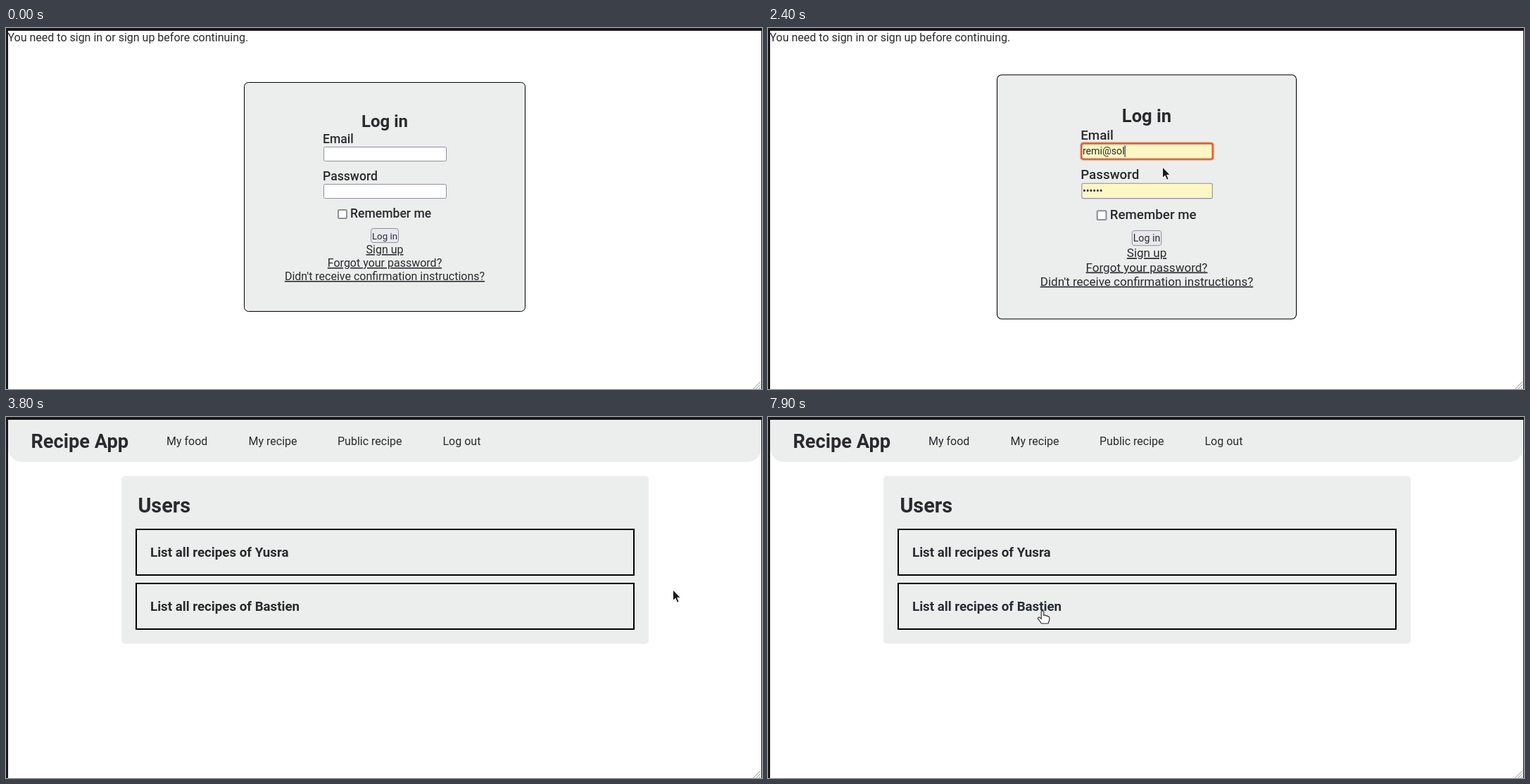
Recreate the animation shown at these times as an HTML page. Size 1074 px wide and 514 px high, loop 8 s.

```html
<!DOCTYPE html>
<html lang="en">
<head>
<meta charset="utf-8">
<title>Recipe App</title>
<style>
  html, body { margin: 0; width: 100%; height: 100%; overflow: hidden; background: #fff; }
  svg { display: block; width: 1074px; height: 514px; font: 16px Roboto, sans-serif; fill: #2a2a2e; }
  .panel { fill: #eceeed; }
  .row { fill: none; stroke: #000; }
  .bold { font-weight: 700; }
  .label { font-size: 17.6px; font-weight: 500; }
  .small { font-size: 13.33px; }
  .item { font-size: 18.72px; font-weight: 700; }
  .mid { text-anchor: middle; }
  .link { text-decoration: underline; }
  .field { fill: #fff; stroke: #8f8f9d; }
  .ring { fill: none; stroke: #e95420; }
</style>
</head>
<body>
<svg viewBox="0 0 1074 514">
  <g id="login">
    <text x="2.5" y="19">You need to sign in or sign up before continuing.</text>
    <g id="card">
      <rect class="panel" x="338.5" y="77.5" width="399" height="326" rx="6" stroke="#000"/>
      <text class="bold mid" x="538" y="141" font-size="24">Log in</text>
      <text class="label" x="450" y="164">Email</text>
      <rect id="email" class="field" x="451.5" y="169.5" width="174" height="20" rx="2"/>
      <g id="focus">
        <rect class="ring" x="449.5" y="167.5" width="178" height="24" rx="4" stroke-width="1.5" opacity=".35"/>
        <rect class="ring" x="451" y="169" width="175" height="21" rx="2.5" stroke-width="2"/>
        <rect id="caret" y="171.5" width="1" height="16"/>
      </g>
      <text id="typed" class="small" x="452.5" y="184"></text>
      <text class="label" x="450" y="217">Password</text>
      <rect id="pass" class="field" x="451.5" y="222.5" width="174" height="20" rx="2"/>
      <text id="dots" class="small" x="452.5" y="237">••••••</text>
      <rect class="field" x="472" y="259" width="12" height="12" rx="1.5" stroke-width="2"/>
      <text class="label" x="489" y="270">Remember me</text>
      <rect id="button" x="518.5" y="285.5" width="39" height="20" rx="3.5"/>
      <text class="small mid" x="538" y="300.5">Log in</text>
      <text class="link mid" x="538" y="321">Sign up</text>
      <text class="link mid" x="538" y="340">Forgot your password?</text>
      <text class="link mid" x="538" y="359">Didn't receive confirmation instructions?</text>
    </g>
  </g>

  <g id="nav">
    <path class="panel" d="M3 4H1073V44a20 20 0 0 1-20 20H23a20 20 0 0 1-20-20z"/>
    <text class="bold" x="35.5" y="44" font-size="27.2">Recipe App</text>
    <text x="228" y="40">My food</text>
    <text x="344.5" y="40">My recipe</text>
    <text x="471" y="40">Public recipe</text>
    <text x="620.5" y="40">Log out</text>
  </g>

  <g id="users">
    <rect class="panel" x="164" y="84" width="749" height="239" rx="5"/>
    <text class="bold" x="187.4" y="136" font-size="28.8">Users</text>
    <g class="row" stroke-width="2">
      <rect x="185" y="160" width="707" height="65"/>
      <rect x="185" y="237" width="707" height="65"/>
    </g>
    <text id="first" class="item" x="205" y="199">List all recipes of Yusra</text>
    <text id="second" class="item" x="205" y="276">List all recipes of Bastien</text>
  </g>

  <g id="recipes">
    <rect class="panel" x="217" y="84" width="642" height="152" rx="4"/>
    <text class="bold" x="234" y="131" font-size="32">All recipes</text>
    <rect class="row" x="229.5" y="149.5" width="617" height="69" rx="3"/>
    <text class="bold link" x="240" y="183" font-size="24">Arepa</text>
    <text x="240" y="204">yammy</text>
  </g>

  <path d="M0 0H1074V514H1073V4H3V514H0z" fill="#19161c"/>
  <path d="M1061.5 514l10.500-10.500M1065.500 514l6.500-6.500M1069.500 514l2.500-2.500" stroke="#85858a"/>

  <g id="pointer">
    <path id="arrow" d="M0 0V15.500L3.600 12.200L6 18.200L8.600 17.100L6.200 11.300H10.800z" fill="#1c1c1f" stroke="#fff" stroke-width=".9"/>
    <path id="beam" d="M-3-6.500H-1L0-5.500L1-6.500H3M0-5.500V5.500M-3 6.500H-1L0 5.500L1 6.500H3" fill="none" stroke="#111"/>
    <path id="hand" d="M-1.800 1Q0-1 1.800 1V6.500Q4 5.300 5 7.200Q7 6.300 7.800 8.200Q9.600 7.800 9.800 10V13Q9 15.500 8 18H-1.500Q-3.500 14.500-6.500 11.300Q-6.800 8.800-4.300 9.200L-1.800 11.300z" fill="#fff" stroke="#222" stroke-width="1.100"/>
  </g>
</svg>
<script>
const $ = id => document.getElementById(id);
const LOOP = 8000, STEP = 100;
const clamp = v => Math.max(0, Math.min(1, v));
const show = (id, on) => $(id).setAttribute('visibility', on ? 'inherit' : 'hidden');

// Pointer path: time, x, y and the shape used from that time on
const path = [
  [300, 936, 215, 'arrow'], [400, 765, 205, 'arrow'], [500, 690, 193, 'arrow'],
  [700, 620, 176, 'beam'], [1000, 591, 171, 'beam'], [1500, 580, 166, 'beam'],
  [1900, 580, 166, 'beam'], [2000, 575, 185, 'arrow'], [2300, 560.5, 198, 'arrow'],
  [2500, 560.5, 198, 'arrow'], [3100, 552, 305, 'arrow'], [3400, 552, 305, 'arrow'],
  [3700, 939, 245, 'arrow'], [3900, 956, 247, 'arrow'], [4100, 956, 247, 'arrow'],
  [4500, 640, 289, 'arrow'], [4700, 420, 225, 'arrow'], [4800, 390, 200, 'hand'],
  [4900, 388, 196, 'hand'], [5100, 391, 197, 'hand'], [5200, 409, 200, 'arrow'],
  [5300, 409, 200, 'arrow'], [5400, 966, 278, 'arrow'], [5600, 966, 278, 'arrow'],
  [6200, 805, 299, 'arrow'], [6300, 805, 299, 'arrow'], [6400, 448.5, 290, 'arrow'],
  [6800, 60, 45, 'hand'], [7000, 38, 24, 'hand'], [7200, 46, 24, 'hand'],
  [7300, 46, 24, 'hand'], [7400, 100, 90, 'arrow'], [7700, 400, 343, 'arrow'],
  [7800, 394, 305, 'arrow'], [7900, 390, 276, 'hand']
];

// cubic-bezier(.25, .1, .25, 1)
function ease(x) {
  x = clamp(x);
  let lo = 0, hi = 1, u;
  for (let i = 0; i < 24; i++) {
    u = (lo + hi) / 2;
    const bx = .75 * u * (1 - u) + u ** 3;
    if (bx < x) lo = u; else hi = u;
  }
  return .3 * u * (1 - u) ** 2 + 3 * u * u * (1 - u) + u ** 3;
}

function cardScale(t) {
  if (t < 2064) return 1 + .3 * ease((t - 420) / 700);
  if (t < 2420) return 1.3 - .3 * ease((t - 2064) / 700);
  return 1.057 + .243 * ease((t - 2420) / 550);
}

function tint(id, p) {
  const mix = (a, b) => Math.round(a + (b - a) * clamp(p));
  $(id).setAttribute('fill', `rgb(${mix(42, 34)},${mix(42, 58)},${mix(46, 92)})`);
}

function drawPointer(t) {
  show('pointer', t >= path[0][0]);
  const i = Math.max(0, path.findLastIndex(k => k[0] <= t));
  const a = path[i], b = path[i + 1] || a;
  const p = b === a ? 0 : clamp((t - a[0]) / (b[0] - a[0]));
  const at = n => a[n] + (b[n] - a[n]) * p;
  $('pointer').setAttribute('transform', `translate(${at(1)} ${at(2)})`);
  for (const kind of ['arrow', 'beam', 'hand']) show(kind, kind === a[3]);
}

function drawLogin(t) {
  $('card').setAttribute('transform',
    `translate(538 240.5) scale(${cardScale(t)}) translate(-538 -240.5)`);
  const filled = t >= 2300, pressed = t >= 3200;
  $('typed').textContent = filled ? 'remi@sol' : t >= 1700 ? 'r' : '';
  show('dots', filled);
  show('focus', t >= 1300 && !pressed);
  $('caret').setAttribute('x', 452.5 + $('typed').getComputedTextLength());
  for (const id of ['email', 'pass']) $(id).style.fill = filled ? '#fcf7c5' : '#fff';
  $('email').style.stroke = t >= 700 && t < 1300 ? '#5b5b66' : '#8f8f9d';
  $('button').setAttribute('fill', pressed ? '#eeeeef' : '#e9e9ed');
  $('button').setAttribute('stroke', pressed ? '#c2c2c8' : '#8f8f9d');
}

function draw(t) {
  const login = t < 3600, recipes = t >= 5100 && t < 7200;
  show('login', login);
  show('nav', !login);
  show('users', !login && !recipes);
  show('recipes', recipes);
  if (login) drawLogin(t);
  tint('first', t < 5100 ? (t - 4700) / 250 : 0);
  tint('second', (t - 7850) / 250);
  drawPointer(t);
}

const start = performance.now();
function frame() {
  const t = (performance.now() - start) % LOOP;
  draw(Math.floor(t / STEP) * STEP);
  requestAnimationFrame(frame);
}
frame();
</script>
</body>
</html>
```
